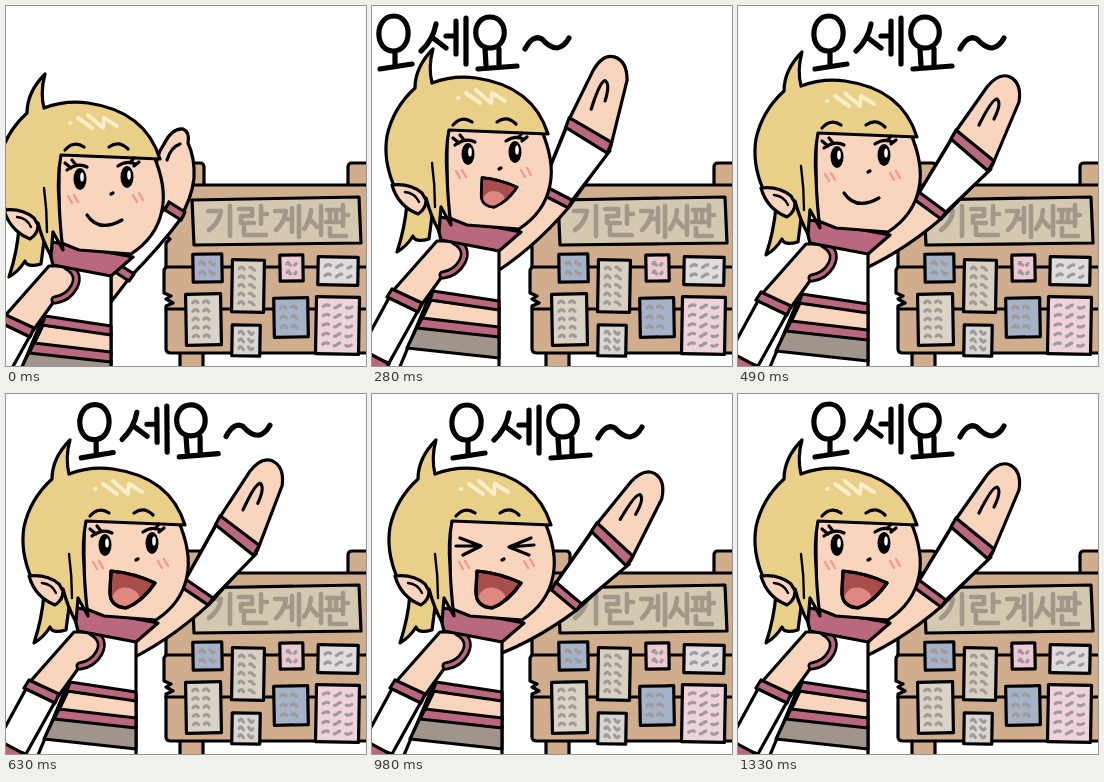
Recreate the animation shown at these times as an HTML page. Size 360 by 360 pixels, loop 1400 ms.

```html
<!DOCTYPE html>
<html lang="ko">
<head>
<meta charset="utf-8">
<title>오세요~</title>
<style>
  html, body { margin: 0; width: 100%; height: 100%; overflow: hidden; background: #fff; }
  svg { display: block; width: 100vw; height: 100vh; }
  path, rect, ellipse { stroke: #000; stroke-width: 3.2; stroke-linejoin: round; stroke-linecap: round; }
  .line { fill: none; }
  .dot { stroke: none; }
  .white { fill: #fff; }
  .skin { fill: #f9d5be; }
  .pink { fill: #ba687e; }
  .wood { fill: #d0ae8d; }
  .hair { fill: #e9cf87; }
  .shine { fill: none; stroke: #f8eec8; stroke-width: 4; }
  .blush { fill: none; stroke: #f09a92; stroke-width: 2.5; }
  .sign { fill: none; stroke: #a2988a; stroke-width: 4.6; }
  .note { fill: none; stroke: #a09a98; stroke-width: 3.2; stroke-dasharray: 6 6.5; }
  .talk { fill: none; stroke-width: 5.2; }
</style>
</head>
<body>
<svg viewBox="0 0 360 360">
  <g id="board">
    <path class="wood" d="M173 182V161Q173 157 177 157H194Q198 157 198 161V182M342 182V161Q342 157 346 157H366V182"/>
    <path class="wood" d="M174 340V364H197V340"/>
    <path class="wood" d="M366 179H164Q160 179 160 184V230L164 233L160 237V261L158 264V287L165 290L160 293L167 297L160 300V343Q160 347 165 347H366Z"/>
    <path class="line" d="M160 261H362M160 303H362"/>
    <path d="M186 194L353 191L355 237L188 239Z" fill="#d4c9b0"/>
    <g aria-label="기란 게시판">
      <path class="sign" d="M202 205H215Q213 217 203 224M224 200V230"/>
      <path class="sign" d="M233 203H246V210H235V217H248M255 200V218M255 208H261M238 221V229H260"/>
      <path class="sign" d="M269 205H280Q278 217 270 224M278 213H285M286 202V226M293 200V231"/>
      <path class="sign" d="M305 204Q304 215 298 223M304 213L311 221M315 200V229"/>
      <path class="sign" d="M321 204H333M324 205V215M330 205V215M320 216H334M337 199V220M337 209H342M324 222V230H340"/>
    </g>
    <g id="notes"></g>
  </g>

  <g id="wave">
    <path class="skin" d="M128 236Q155 218 179 190L218 125L249 81Q261 66 272 71Q284 77 281 96L254 160L204 212Q160 250 110 270L90 245Z"/>
    <path class="white" d="M181 187L215 131L253 163L206 208Z"/>
    <path class="pink" d="M181 186L208 206L203 213L177 194ZM218 124L256 155L250 165L213 133Z"/>
    <path class="line" d="M241 119Q254 93 259 93Q264 97 256 113"/>
  </g>

  <g id="girl">
    <g id="bent">
      <path class="skin" d="M174 150Q174 128 183 116Q191 100 202 101Q209 104 207 115Q214 130 213 150Q211 170 198 192L150 248L130 274V240L178 182Z"/>
      <path class="white" d="M186 178L202 188Q178 220 150 248L135 238Z"/>
      <path class="pink" d="M188 174L204 184L200 192L184 182ZM139 237L153 246L148 253L134 244Z"/>
      <path class="line" d="M186 132Q190 119 199 116"/>
    </g>

    <path class="white" d="M76 236L130 244V390H20L62 289L70 262Z"/>
    <path class="skin" d="M62 297L130 306V326L52 318Z"/>
    <path d="M48 324L130 333V355L38 345Z" fill="#a0948c"/>
    <path class="pink" d="M64 288L130 298V307L61 297ZM53 315L130 324V334L48 325Z"/>
    <path class="skin" d="M86 238Q99 246 93 259Q87 270 74 272L51 304L22 290L68 238Z"/>
    <path class="line" d="M86 238Q100 246 93 259Q87 270 74 272" style="stroke-width:9"/>
    <path class="line" d="M86 238Q100 246 93 259Q87 270 74 272" style="stroke:#ba687e;stroke-width:3.6"/>
    <path class="white" d="M21 293L50 306L20 360L-10 350Z"/>
    <path class="pink" d="M23 286L53 300L49 309L18 294ZM-8 346L20 361L14 372L-14 360Z"/>

    <path class="hair" d="M38 200Q36 225 28 249Q38 243 44 233Q46 240 60 236L66 190Z"/>
    <path class="pink" d="M66 213L152 229L130 248L72 237Z"/>
    <path class="skin" d="M78 126H172Q186 158 181 182Q176 209 150 226L98 222L78 214Z"/>
    <path class="hair" d="M46 85Q46 64 64 46Q59 64 63 80Q84 72 107 75Q164 83 179 131L80 127Q76 148 78 172Q79 200 82 222L72 204L70 228Q62 214 57 195L25 183Q14 157 18 133Q24 105 46 85Z"/>
    <path class="skin" d="M53 190Q41 180 23 182Q29 203 49 211Q57 206 57 197Z"/>
    <path class="line" d="M36 189Q46 190 50 199M63 160Q66 182 66 204" style="stroke-width:2.4"/>
    <path class="shine" d="M89 95H89.5M97 90L111 100M107 87L122 100L123 90L136 98"/>
    <path class="line" d="M84 122Q93 112 103 119M128 119Q138 112 147 121"/>
    <g id="open">
      <ellipse class="dot" cx="99" cy="151" rx="6.5" ry="11"/>
      <ellipse class="dot" cx="146" cy="149" rx="6.5" ry="11"/>
      <ellipse class="dot white" cx="101" cy="149" rx="1.8" ry="4.5"/>
      <ellipse class="dot white" cx="148" cy="147" rx="1.8" ry="4.5"/>
      <path class="line" d="M86 142Q97 134 106 139M90 140L84 135M95 137L91 132M137 138Q146 132 154 136M149 135L153 130M153 138L158 134"/>
    </g>
    <path id="squint" class="line" d="M88 144L109 152L91 161M84 152L109 152M159 144L137 153L157 161M162 151L137 153"/>
    <path class="line" d="M130 166L132 165"/>
    <path class="blush" d="M87 168L91 175M93 167L97 174M152 167L156 174M158 165L162 172"/>
    <path id="smile" class="line" d="M106 187Q118 205 141 192"/>
    <g id="mouth">
      <path d="M105 177Q128 179 149 189Q136 208 120 214Q103 213 104 196Z" fill="#a94c4c"/>
      <path class="dot" d="M106 203Q112 190 126 195Q134 199 133 204Q124 212 119 212Q109 211 106 203Z" fill="#e08781"/>
      <path class="line" d="M105 177Q128 179 149 189Q136 208 120 214Q103 213 104 196Z"/>
    </g>
  </g>

  <g id="talk" aria-label="오세요~">
    <path class="talk" d="M91 10C71 10 71 45 90 45C110 45 110 10 91 10M92 46V60M77 63L109 58"/>
    <path class="talk" d="M133 18Q130 34 118 45M130 32L143 42M143 30H152M153 15V48M163 12V58"/>
    <path class="talk" d="M187 11C168 11 168 42 187 42C206 42 206 11 187 11M182 43L183 59M196 43V59M175 63L214 60"/>
    <path class="talk" d="M222 43Q230 28 239 33Q247 42 254 42Q261 41 266 32"/>
  </g>
</svg>
<script>
const STEP = 70, STEPS = 20;
const el = id => document.getElementById(id);
const show = (id, on) => { el(id).style.display = on ? "" : "none"; };
const place = (id, value) => el(id).setAttribute("transform", value);

// Board notes: x, y, width, height, colour, rows
const notes = [
  [187, 248, 29, 28, "#a5b2c7", 2], [226, 254, 32, 52, "#d8d0c2", 5],
  [274, 249, 23, 26, "#edc9d4", 2], [312, 251, 40, 28, "#dfdddd", 2],
  [180, 288, 35, 51, "#d9d4c6", 5], [226, 319, 28, 31, "#d9d7d4", 3],
  [268, 292, 34, 39, "#a5b2c7", 3], [310, 291, 43, 57, "#efd3dc", 5]
];
el("notes").innerHTML = notes.map(([x, y, w, h, fill, rows], n) => {
  const len = (w - 14) / 4;
  let d = "";
  for (let r = 1; r <= rows; r++) {
    d += `M${x + 7} ${y + h * r / (rows + 1)}q${len / 2} -3 ${len} 0t${len} 0t${len} 0t${len} 0`;
  }
  const tilt = n % 2 ? 1 : -1;
  return `<g transform="rotate(${tilt} ${x + w / 2} ${y + h / 2})">
    <rect x="${x}" y="${y}" width="${w}" height="${h}" fill="${fill}"/><path class="note" d="${d}"/></g>`;
}).join("");

// Entrance: body shift x, y; arm angle; text shift x, y
const entry = [
  [-25, 22, 0, 0, 0], [-21, 18, 0, 0, 0], [-13, 8, -24, -200, 0], [-6, 0, -17, -125, 0],
  [-3, -3, -9, -69, 0], [-2, -2, -2, -32, 0], [-1, -1, 4, -6, 0]
];
// Waving: arm angle; text shift x, y; text angle
const swing = [[-9, -4, 0, -1.5], [-2, -2, 0, -0.5], [3.8, 4, 1, 0], [0, 0, 0, 0]];

function draw(step) {
  const entering = step < entry.length;
  let [x, y, arm, tx, ty] = entry[Math.min(step, entry.length - 1)];
  let turn = 0;
  if (!entering) {
    x = y = 0;
    [arm, tx, ty, turn] = swing[step % 4];
  }
  const raised = step > 1;
  const wide = step > 8;
  const talking = wide || (step > 1 && step < 6);
  const blink = step === 13 || step === 14;

  place("girl", `translate(${x} ${y})`);
  place("wave", `translate(${x} ${y}) rotate(${arm} 150 232)`);
  place("talk", `translate(${tx} ${ty}) rotate(${turn} 170 35)`);
  place("mouth", wide ? "" : "translate(29 33) scale(.8)");
  show("wave", raised);
  show("bent", !raised);
  show("talk", raised);
  show("mouth", talking);
  show("smile", !talking);
  show("squint", blink);
  show("open", !blink);
}

const start = performance.now();
function tick() {
  draw(Math.floor((performance.now() - start) / STEP) % STEPS);
  requestAnimationFrame(tick);
}
tick();
</script>
</body>
</html>
```
